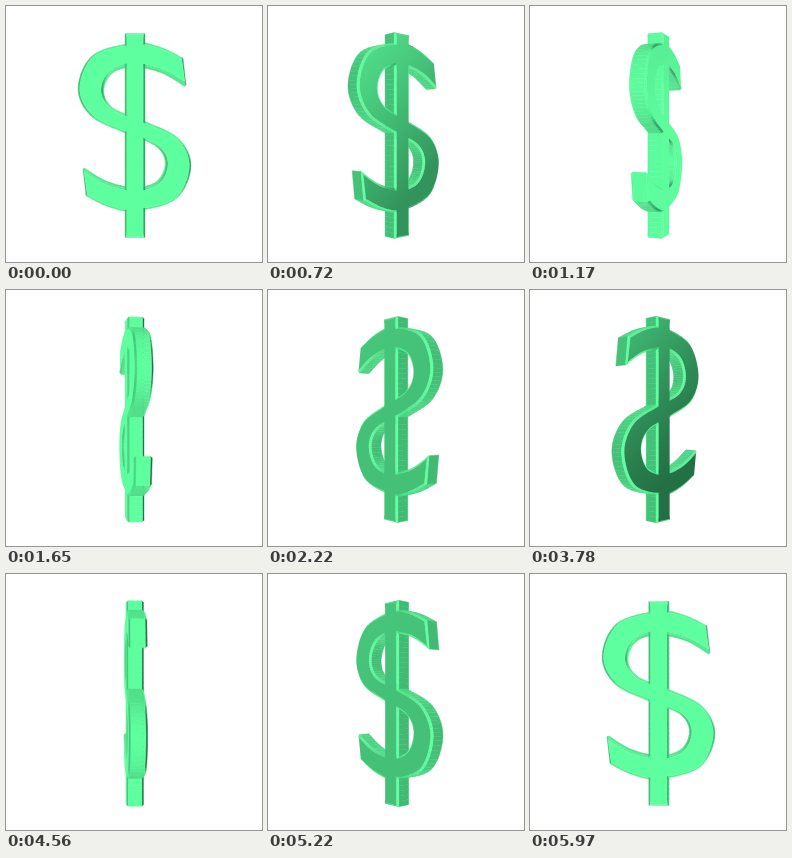
An HTML page with a canvas for the animation above (6000 ms loop, 256 px wide and 256 px high).

```html
<!DOCTYPE html>
<html>
<head>
<meta charset="utf-8">
<title>Turning dollar sign</title>
<style>
html, body { margin: 0; height: 100%; overflow: hidden; background: #fff; }
canvas { display: block; }
</style>
</head>
<body>
<canvas id="stage" width="256" height="256"></canvas>
<script>
const ctx = document.getElementById('stage').getContext('2d');
const LOOP = 6000, STEP = 30, CX = 128.4, CY = 129.5;
const HALF = 8.5, BEVEL = 1.8, CAM = 480, FOCAL = 473;
const BRIGHT = [94, 255, 159], DARK = [32, 105, 64];

// One edge of the S, from its top right tip to its lower left tip
const EDGE = [
  [177, 52], [154, 41], [128, 37], [87, 49], [72, 82], [85, 110], [119, 127],
  [150, 140], [160, 157], [152, 176], [130, 183], [101, 177], [77, 163]
];

// Smooth curve through the points
function spline(pts, n = 8) {
  const at = i => pts[Math.max(0, Math.min(pts.length - 1, i))];
  const out = [];
  for (let i = 0; i < pts.length - 1; i++) {
    for (let j = 0; j < n; j++) {
      const t = j / n;
      out.push([0, 1].map(k => {
        const [a, b, c, d] = [-1, 0, 1, 2].map(o => at(i + o)[k]);
        return b + t / 2 * (c - a + t * (2 * a - 5 * b + 4 * c - d + t * (3 * (b - c) + d - a)));
      }));
    }
  }
  return [...out, at(pts.length - 1)];
}

// The other edge is the same curve after a half turn
function letterOutline() {
  const edge = spline(EDGE);
  return [...edge, ...edge.map(([x, y]) => [257 - x, 242 - y])];
}

function barOutline(left, right, top, bottom, n = 40) {
  const rows = Array.from({ length: n + 1 }, (_, i) => top + (bottom - top) * i / n);
  return [...rows.map(y => [left, y]), ...rows.reverse().map(y => [right, y])];
}

const unit = (x, y) => {
  const len = Math.hypot(x, y) || 1;
  return [x / len, y / len];
};

// Full outline plus a copy drawn in by the bevel
function solid(points) {
  const outer = points.map(([x, y]) => [x - CX, y - CY]);
  const n = outer.length;
  const inner = outer.map(([x, y], i) => {
    const a = outer[(i + n - 1) % n], b = outer[(i + 1) % n];
    const [px, py] = unit(x - a[0], y - a[1]), [qx, qy] = unit(b[0] - x, b[1] - y);
    const [dx, dy] = unit(px + qx, py + qy);
    return [x + dy * BEVEL, y - dx * BEVEL];
  });
  return { outer, inner };
}

const solids = [letterOutline(), barOutline(119, 139, 27.5, 231.5)].map(solid);

// Reflected tone of a surface turned by yaw degrees
function tone(yaw, flat = 1, gain = 1) {
  const bump = (mid, width) => Math.exp(-(((yaw - mid) / width) ** 2));
  const t = flat * (bump(52, 10) + 0.42 * bump(-45, 15));
  return `rgb(${BRIGHT.map((v, i) => Math.round((v + (DARK[i] - v) * t) * gain))})`;
}

const degrees = (x, z) => Math.atan2(x, z) * 180 / Math.PI;

function draw(angle) {
  const c = Math.cos(angle), s = Math.sin(angle);
  const spin = (x, y, z) => [x * c + z * s, y, z * c - x * s];
  const project = ([x, y, z]) => {
    const k = FOCAL / (CAM - z);
    return [CX + x * k, CY + y * k];
  };
  const trace = pts => {
    pts.forEach((p, i) => ctx[i ? 'lineTo' : 'moveTo'](...project(p)));
    ctx.closePath();
  };

  ctx.fillStyle = '#fff';
  ctx.fillRect(0, 0, 256, 256);

  const walls = [];
  for (const { outer, inner } of solids) {
    for (const tilt of [-1, 0, 1]) {
      const rim = HALF - BEVEL;
      const [a, za] = tilt > 0 ? [inner, HALF] : [outer, rim];
      const [b, zb] = tilt < 0 ? [inner, -HALF] : [outer, -rim];
      const zFront = tilt < 0 ? -rim : za, zBack = tilt > 0 ? rim : zb;
      outer.forEach(([x, y], i) => {
        const j = (i + 1) % outer.length;
        const [dx, dy] = unit(outer[j][0] - x, outer[j][1] - y);
        const k = Math.hypot(1, tilt);
        const [nx, ny, nz] = spin(-dy / k, dx / k, tilt / k);
        const quad = [[a[i], zFront], [a[j], zFront], [b[j], zBack], [b[i], zBack]]
          .map(([p, z]) => spin(...p, z));
        const mid = [0, 1, 2].map(m => quad.reduce((sum, p) => sum + p[m] / 4, 0));
        if (nz * (CAM - mid[2]) - nx * mid[0] - ny * mid[1] <= 0) return;
        const color = tone(degrees(nx, nz), 1 - ny * ny, 1 - 0.15 * ny * ny);
        walls.push({ depth: mid[2], color, quad });
      });
    }
  }
  walls.sort((p, q) => p.depth - q.depth);
  ctx.lineWidth = 0.4;
  ctx.lineJoin = 'round';
  for (const { color, quad } of walls) {
    ctx.fillStyle = ctx.strokeStyle = color;
    ctx.beginPath();
    trace(quad);
    ctx.fill();
    ctx.stroke();
  }

  // The face turned to the viewer lies in front of every wall
  const side = c >= 0 ? 1 : -1;
  const yaw = degrees(side * s, side * c);
  const reach = 56 * Math.abs(c) + 6;
  const sheen = ctx.createLinearGradient(CX - reach, 70, CX + reach, 150);
  for (let i = 0; i <= 4; i++) sheen.addColorStop(i / 4, tone(yaw - 3 + 1.5 * i));
  ctx.fillStyle = sheen;
  ctx.beginPath();
  for (const { inner } of solids) trace(inner.map(p => spin(...p, side * HALF)));
  ctx.fill();
}

const start = performance.now();
function frame() {
  const t = Math.max(0, performance.now() - start) % LOOP;
  draw(Math.floor(t / STEP) * STEP / LOOP * 2 * Math.PI);
  requestAnimationFrame(frame);
}
frame();
</script>
</body>
</html>
```
